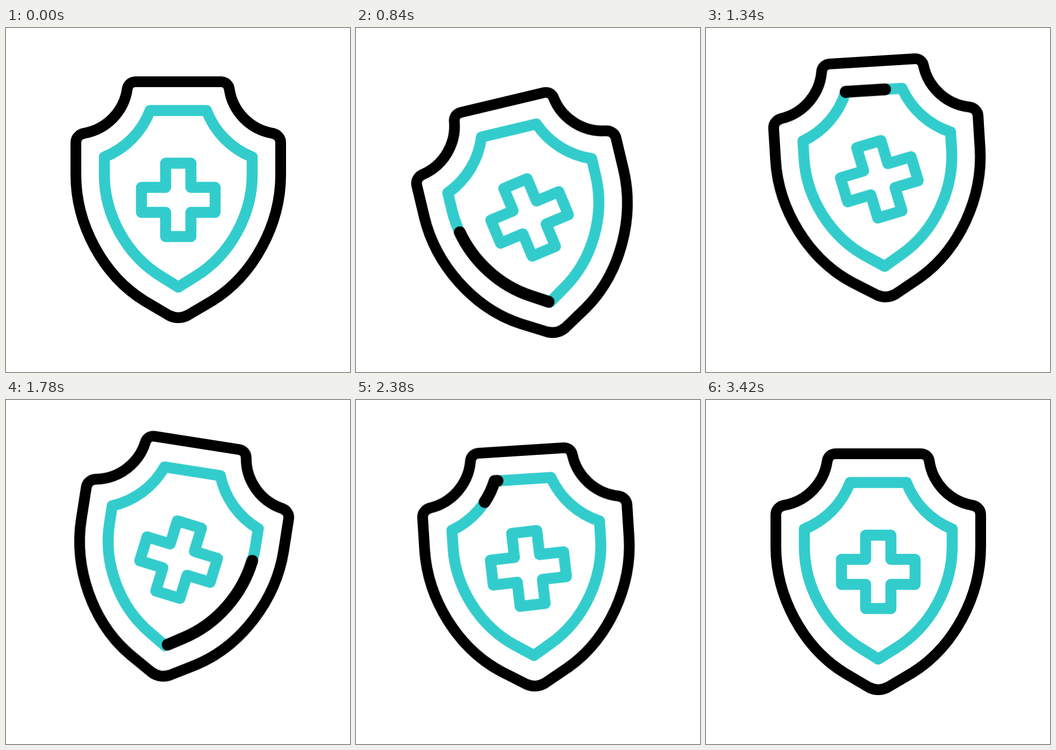
Animation of 640 by 640 pixels, one loop 3.6 s. Source, as an HTML page without scripts:

```html
<!DOCTYPE html>
<html lang="en">
<head>
<meta charset="utf-8">
<title>Rocking shield</title>
<style>
  @property --tail { syntax: "<length>"; inherits: false; initial-value: 50px; }
  @property --head { syntax: "<length>"; inherits: false; initial-value: 50px; }

  html, body { margin: 0; width: 100%; height: 100%; overflow: hidden; background: #fff; }
  svg {
    display: block;
    width: 100vw;
    height: 100vh;
    fill: none;
    stroke: #33cccc;
    stroke-width: 20.5;
    stroke-linejoin: round;
    stroke-linecap: round;
  }
  .rim { stroke: #000; stroke-width: 20; }
  .glint {
    stroke: #000;
    stroke-width: 22;
    stroke-dasharray: calc(var(--head) - var(--tail)) 200px;
    stroke-dashoffset: calc(-1 * var(--tail));
  }

  .drift, .bob, .tilt, .spin, .glint {
    animation: 3600ms cubic-bezier(.333, 0, .667, 1) infinite;
    transform-origin: 320.5px 320px;
  }
  .drift { animation-name: drift; }
  .bob { animation-name: bob; }
  .tilt { animation-name: tilt; }
  .spin { animation-name: spin; }
  .glint { animation-name: tail, head, show; }

  @keyframes drift {
    0%, 83.5%, 100% { transform: translateX(0); }
    28.6% { transform: translateX(2.9px); }
    49.4% { transform: translateX(.6px); }
  }
  @keyframes bob {
    0%, 83.5%, 100% { transform: translateY(0); }
    20.8% { transform: translateY(36px); }
    42.7% { transform: translateY(-52px); }
    57.6% { transform: translateY(15.5px); }
    72.2% { transform: translateY(-19.5px); }
  }
  @keyframes tilt {
    0%, 2.7%, 89.7%, 100% { transform: rotate(0deg); }
    28.6% { transform: rotate(-15deg); }
    46.9% { transform: rotate(10deg); }
    62.5% { transform: rotate(-5deg); }
    75.6% { transform: rotate(2.2deg); }
  }
  /* the cross follows the shield a little later */
  @keyframes spin {
    0%, 8.2%, 95.3%, 100% { transform: rotate(0deg); }
    34.2% { transform: rotate(-15deg); }
    52.5% { transform: rotate(10deg); }
    68.1% { transform: rotate(-3.5deg); }
    81.1% { transform: rotate(2.2deg); }
  }
  @keyframes tail {
    0%, 76.7%, 100% { --tail: 50px; }
    24.4% { --tail: 0px; }
    47.6% { --tail: 76.5px; }
    63.9% { --tail: 39px; }
  }
  @keyframes head {
    0%, 2.7%, 76.7%, 100% { --head: 50px; }
    28.6% { --head: 20px; }
    48.5% { --head: 100px; }
    65% { --head: 44.9px; }
  }
  @keyframes show {
    0%, .5% { stroke-opacity: 0; }
    .51%, 76.6% { stroke-opacity: 1; }
    76.61%, 100% { stroke-opacity: 0; }
  }
</style>
</head>
<body>
<svg viewBox="0 0 640 640">
  <defs>
    <!-- clockwise from the bottom tip -->
    <path id="inner" pathLength="100" d="M320.5 482 L290 463 C222 422 183 345 183 273 V240
      A150 150 0 0 0 268 153.5 H373 A150 150 0 0 0 458 240 V273
      C458 345 419 422 351 463 L320.5 482 Z"/>
  </defs>
  <g class="drift"><g class="bob"><g class="tilt">
    <path class="rim" d="M241 100 H400 C408 100 414.5 106 415.5 114 A98 98 0 0 0 494 195.5
      C504 197 511 204 511 213 V273 C511 365 461 460 383 508 L338 534.5
      Q320.5 543.5 303 534.5 L258 508 C180 460 130 365 130 273 V213
      C130 204 137 197 147 195.5 A98 98 0 0 0 225.5 114 C226.5 106 233 100 241 100 Z"/>
    <use href="#inner"/>
    <use class="glint" href="#inner"/>
    <path class="spin" d="M297 251.5 H344 V296.5 H389 V343 H344 V388 H297 V343 H252 V296.5 H297 Z"/>
  </g></g></g>
</svg>
</body>
</html>
```
